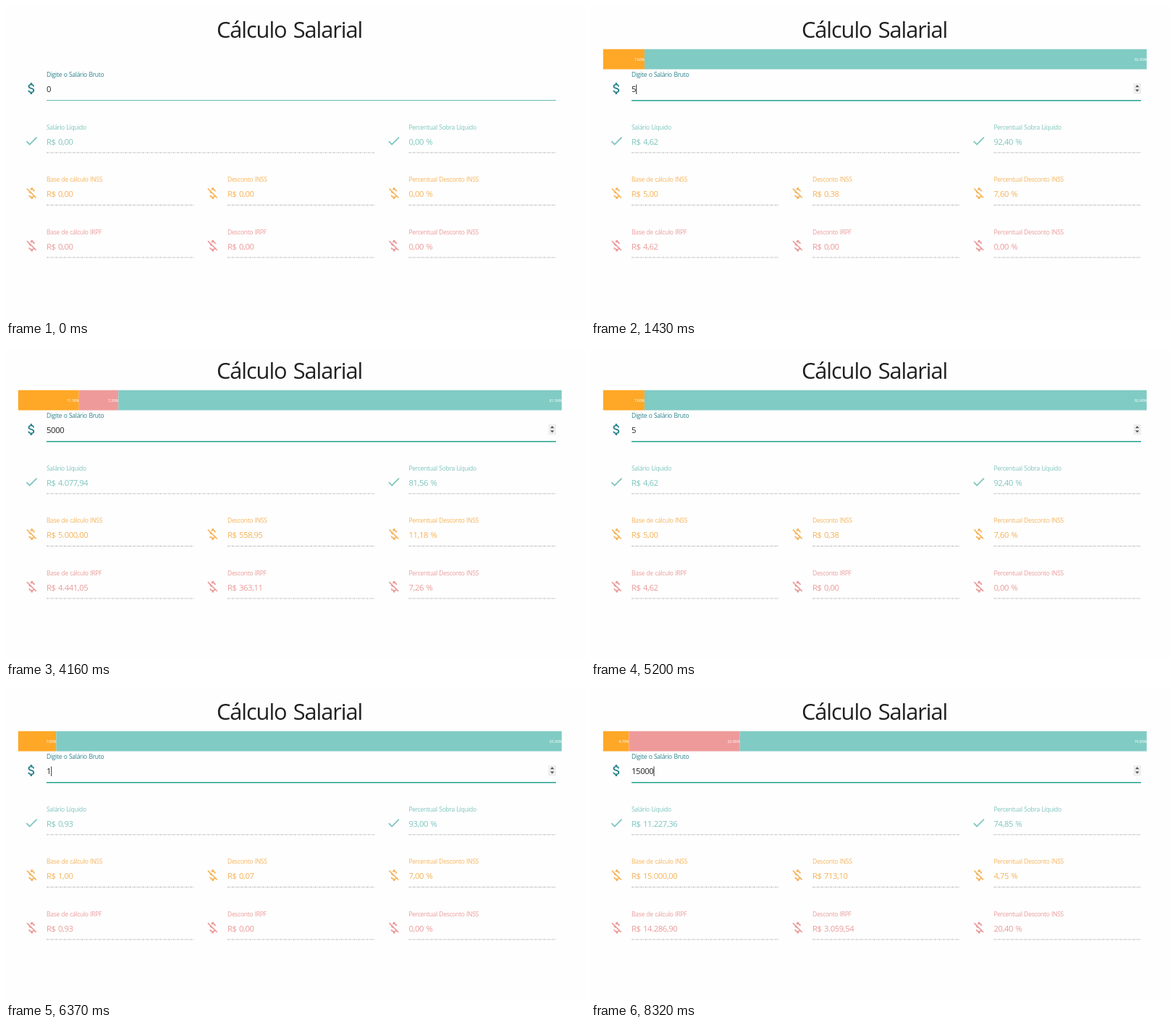
Write an HTML page that moves like this. It is 800 px wide and 433 px high and loops after 8580 ms.

```html
<!DOCTYPE html>
<html lang="pt-BR">
<head>
<meta charset="utf-8">
<title>Cálculo Salarial</title>
<style>
  html, body { margin: 0; width: 100%; height: 100%; overflow: hidden; background: #fefefe; }
  svg { display: block; width: 800px; height: 433px; }
  text { font: 11.3px "Open Sans", "Noto Sans", sans-serif; letter-spacing: -.035em; word-spacing: .07em; white-space: pre; }
  .title { font-size: 30.8px; fill: #212121; text-anchor: middle; }
  .label { font-size: 8.5px; }
  .share { font-size: 5.4px; fill: #fff; text-anchor: end; }
  .dots { stroke: #a8a8a8; stroke-width: .8; stroke-dasharray: 3 1 1 1; }
</style>
</head>
<body>
<svg id="stage" viewBox="0 0 800 433">
  <rect width="800" height="433" fill="#fefefe"/>
  <text class="title" x="391.6" y="44">Cálculo Salarial</text>
</svg>
<script>
const LOOP = 8580, STEP = 130, ROW = 72.5;
const TEAL = '#80cbc4', ORANGE = '#ffa726', PINK = '#ef9a9a';
const COLUMNS = [56, 306, 556.5];
const ICONS = {
  money: 'M11.8 10.9c-2.27-.59-3-1.2-3-2.15 0-1.09 1.01-1.85 2.7-1.85 1.78 0 2.44.85 2.5 2.1h2.21c-.07-1.72-1.12-3.3-3.21-3.81V3h-3v2.16c-1.94.42-3.5 1.68-3.5 3.61 0 2.31 1.91 3.46 4.7 4.13 2.5.6 3 1.48 3 2.41 0 .69-.49 1.79-2.7 1.79-2.06 0-2.87-.92-2.98-2.1h-2.2c.12 2.19 1.76 3.42 3.68 3.83V21h3v-2.15c1.95-.37 3.5-1.5 3.5-3.55 0-2.84-2.43-3.81-4.7-4.4z',
  check: 'M9 16.17L4.83 12l-1.42 1.41L9 19 21 7l-1.41-1.41z',
  off: 'M12.5 6.9c1.78 0 2.44.85 2.5 2.1h2.21c-.07-1.72-1.12-3.3-3.21-3.81V3h-3v2.16c-.53.12-1.03.3-1.48.54l1.47 1.47c.41-.17.91-.27 1.51-.27zM5.33 4.06L4.06 5.33 7.5 8.77c0 2.08 1.56 3.21 3.91 3.91l3.51 3.51c-.34.48-1.05.91-2.42.91-2.06 0-2.87-.92-2.98-2.1h-2.2c.12 2.19 1.76 3.42 3.68 3.83V21h3v-2.15c.96-.18 1.82-.55 2.45-1.12l2.22 2.22 1.27-1.27L5.33 4.06z'
};
// Typed text and caret visibility: [time, value]
const TYPING = [[0, '0'], [650, ''], [1430, '5'], [1690, '50'], [2080, '500'], [2470, '5000'],
  [4550, '500'], [4680, '50'], [4810, '5'], [5330, ''],
  [6370, '1'], [6500, '15'], [6630, '150'], [6890, '1500'], [7150, '15000']];
const CARET = [[0, 0], [130, 1], [1170, 0], [1430, 1], [3120, 0], [3640, 1], [4160, 0], [4550, 1],
  [5200, 0], [5330, 1], [5850, 0], [6370, 1], [7670, 0], [8320, 1]];

const stage = document.getElementById('stage');
function add(tag, attrs, text = '') {
  const node = document.createElementNS('http://www.w3.org/2000/svg', tag);
  set(node, attrs);
  node.textContent = text;
  return stage.appendChild(node);
}
function set(node, attrs) {
  for (const key in attrs) node.setAttribute(key, attrs[key]);
}
const at = (track, t) => track.findLast(([start]) => start <= t)[1];

function field(row, column, end, icon, color, label, valueColor = color) {
  const x = COLUMNS[column], y = row * ROW;
  add('path', { d: ICONS[icon], fill: color, transform: `translate(${x - 31.2} ${103.5 + y}) scale(.875)` });
  add('text', { class: 'label', x, y: 98 + y, fill: color }, label);
  if (row) add('line', { class: 'dots', x1: x, x2: end, y1: 130.4 + y, y2: 130.4 + y });
  return add('text', { x, y: 119 + y, fill: valueColor });
}

const bars = [ORANGE, PINK, TEAL].map(fill => ({
  rect: add('rect', { y: 59.7, height: 27.8, fill }),
  text: add('text', { class: 'share', y: 75.8 })
}));
const input = field(0, 0, 760, 'money', '#2a828c', 'Digite o Salário Bruto', '#212121');
const outputs = [
  field(1, 0, 510, 'check', '#7ec5be', 'Salário Líquido'),
  field(1, 2, 760, 'check', '#7ec5be', 'Percentual Sobra Líquido')
];
for (const [row, color, tax] of [[2, '#f6b35a', 'INSS'], [3, '#ea9b9a', 'IRPF']]) {
  outputs.push(
    field(row, 0, 260, 'off', color, 'Base de cálculo ' + tax),
    field(row, 1, 510, 'off', color, 'Desconto ' + tax),
    field(row, 2, 760, 'off', color, 'Percentual Desconto INSS'));
}
const underline = add('rect', { x: 56, width: 704, y: 130 });
const spinner = [
  add('rect', { x: 749.5, y: 107, width: 10.5, height: 14.5, fill: '#eee' }),
  add('path', { d: 'M752 112.3l2.7-3 2.7 3zM752 115.6l2.7 3 2.7-3z', fill: '#505050' })
];
const caret = add('rect', { y: 108.5, width: .9, height: 13.5, fill: '#212121' });

const cents = v => Number(v.toFixed(2));
const decimal = v => v.toFixed(2).replace('.', ',').replace(/\B(?=(\d{3})+,)/g, '.');
const money = v => 'R$ ' + decimal(v);
const percent = v => decimal(v) + ' %';

function socialTax(gross) {
  let sum = 0, floor = 0;
  for (const [top, rate] of [[1045, .075], [2089.6, .09], [3134.4, .12], [6101.06, .14]]) {
    sum += Math.max(0, Math.min(gross, top) - floor) * rate;
    floor = top;
  }
  return cents(sum);
}
function incomeTax(base) {
  const [, rate, cut] = [[1903.98, 0, 0], [2826.65, .075, 142.8], [3751.05, .15, 354.8],
    [4664.68, .225, 636.13], [Infinity, .275, 869.36]].find(([top]) => base <= top);
  return cents(base * rate - cut);
}

function showSalary(typed) {
  const gross = Number(typed);
  const social = socialTax(gross), base = cents(gross - social);
  const income = incomeTax(base), net = cents(base - income);
  const share = v => gross ? v / gross * 100 : 0;

  input.textContent = typed;
  [money(net), percent(share(net)),
    money(gross), money(social), percent(share(social)),
    money(base), money(income), percent(share(income))
  ].forEach((text, i) => outputs[i].textContent = text);

  let x = 16.8;
  [social, income, net].forEach((part, i) => {
    const width = share(part) * 7.51;
    set(bars[i].rect, { x, width });
    x += width;
    set(bars[i].text, { x });
    bars[i].text.textContent = part ? share(part).toFixed(2) + '%' : '';
  });
  set(caret, { x: 56.2 + (typed ? input.getComputedTextLength() : 0) });
}

function draw(now) {
  const t = now % LOOP;
  showSalary(at(TYPING, t));
  set(caret, { opacity: at(CARET, t) });
  const focus = Math.min(1, Math.floor(t / STEP) / 2);
  set(underline, { height: 1 + focus * .5, fill: focus ? '#24a28c' : '#68b9b0' });
  spinner.forEach(node => set(node, { opacity: t < STEP ? 0 : 1 }));
  requestAnimationFrame(draw);
}
requestAnimationFrame(draw);
</script>
</body>
</html>
```
